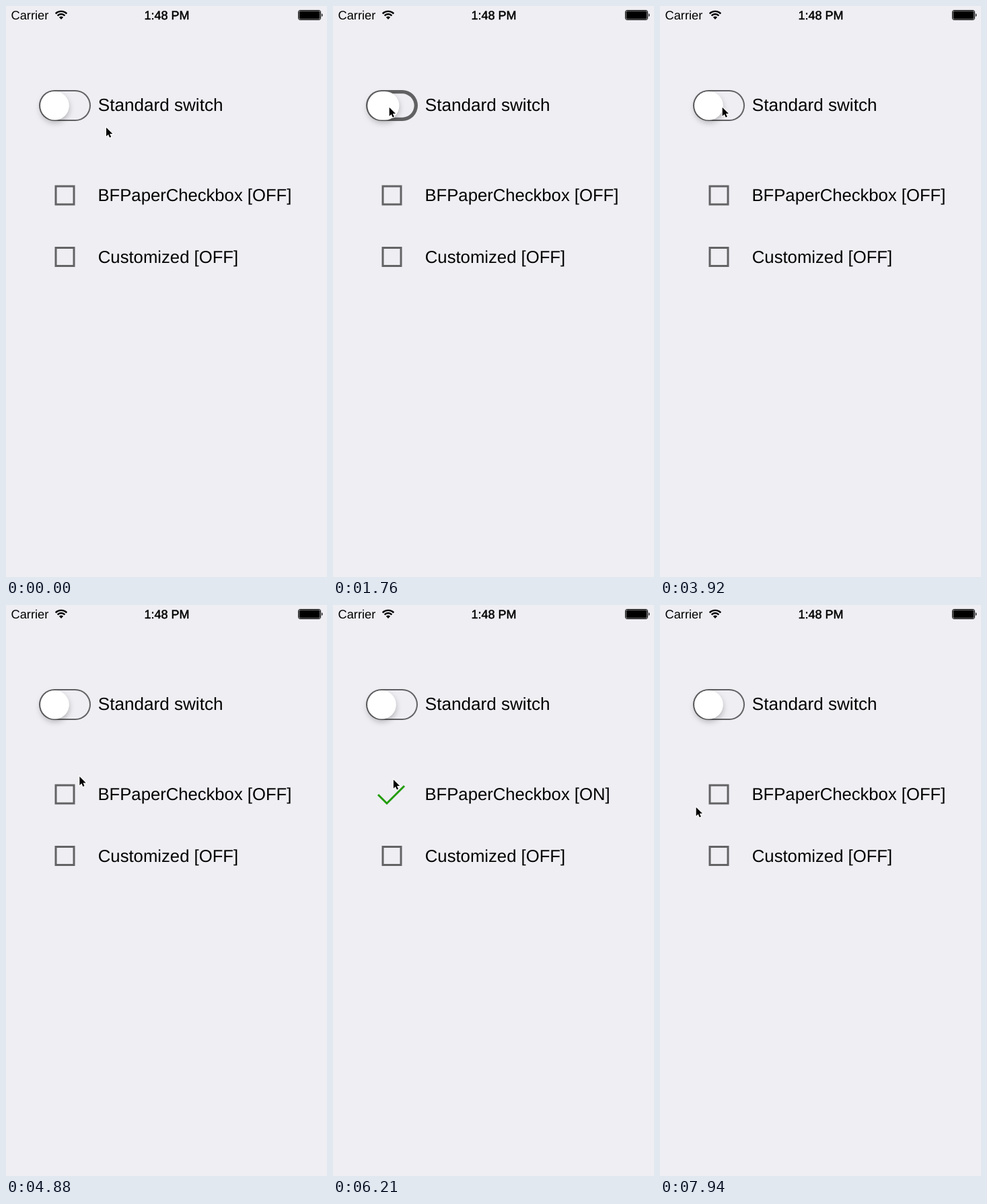
Recreate the animation shown at these times as an HTML page. Size 477 by 849 pixels, loop 8 s.

```html
<!DOCTYPE html>
<html lang="en">
<head>
<meta charset="utf-8">
<title>Switch and checkboxes</title>
<style>
  html, body { margin: 0; width: 100%; height: 100%; overflow: hidden; background: #eeeef3; }
  svg { display: block; width: 477px; height: 849px; font-family: "Liberation Sans", Arial, sans-serif; text-rendering: geometricPrecision; }
  .box { fill: none; stroke: #636365; stroke-width: 3; vector-effect: non-scaling-stroke; }
  #thumb { filter: drop-shadow(0 4px 4.5px rgba(0, 0, 0, .25)); }
</style>
</head>
<body>
<svg viewBox="0 0 477 849">
  <rect width="477" height="849" fill="#eeeef3"/>

  <!-- status bar -->
  <text x="7.5" y="20" font-size="18.3">Carrier</text>
  <g fill="none" stroke="#000" stroke-width="2.4">
    <path d="M73.7 11.3A11.8 11.8 0 0 1 90.3 11.3M76.6 14.3A7.6 7.6 0 0 1 87.4 14.3"/>
    <path d="M82 20L78.9 16.8A4.4 4.4 0 0 1 85.1 16.8Z" fill="#000" stroke="none"/>
  </g>
  <text x="239" y="20" font-size="18" text-anchor="middle" stroke="#000" stroke-width=".5">1:48 PM</text>
  <rect x="434.5" y="6.5" width="33" height="14" rx="2.5" fill="none" stroke="#000"/>
  <rect x="435.6" y="7.6" width="30.8" height="11.8" rx="1.6"/>
  <path d="M469 11a2 2.6 0 0 1 0 5z"/>

  <!-- switch -->
  <rect id="track" x="49" y="125" width="77" height="46" rx="23"/>
  <rect id="inner" fill="#eeeef3"/>
  <rect id="thumb" y="127" height="42.5" rx="21.2" fill="#fff"/>

  <!-- checkboxes -->
  <circle id="ripple" cx="87.5" cy="281.5"/>
  <rect id="box" class="box" x="-13.5" y="-13.5" width="27" height="27"/>
  <path id="check" fill="none" stroke="#219c08" stroke-width="3"/>
  <rect class="box" x="74" y="359.5" width="27" height="27"/>

  <text x="136.8" y="156.3" font-size="26.1">Standard switch</text>
  <text id="label" x="136.5" y="290" font-size="25.65"></text>
  <text x="136.8" y="381.5" font-size="25.7">Customized [OFF]</text>

  <path id="cursor" d="M0 .7V13.8L3 11L5 15.6L7.2 14.7L5.2 10.1H9.3Z" stroke="#fff" stroke-width="2" paint-order="stroke"/>
</svg>
<script>
const LOOP = 8000;
const $ = id => document.getElementById(id);
const set = (id, attrs) => { for (const k in attrs) $(id).setAttribute(k, attrs[k]); };
const mix = (a, b, p) => a + (b - a) * p;
const mixColor = (a, b, p) => `rgb(${a.map((v, i) => mix(v, b[i], p))})`;
const ramp = (t, from, to) => Math.min(1, Math.max(0, (t - from) / (to - from)));
const easeOut = p => 1 - (1 - p) ** 2;
const easeInOut = p => p < .5 ? 2 * p * p : 1 - 2 * (1 - p) ** 2;
const smooth = (t, from, to) => easeInOut(ramp(t, from, to));

const GRAY = [97, 97, 99], GREEN = [38, 155, 5];

// time, x, y of the pointer tip
const POINTER = [
  [0, 149, 180], [660, 149, 180], [1280, 83.7, 150], [2450, 83.7, 150], [2550, 86, 150],
  [2580, 86, 150], [2810, 91.8, 150], [2930, 91.8, 150], [2970, 92.7, 150], [4180, 92.7, 150],
  [4970, 109.8, 257], [5950, 109.8, 257], [6600, 48, 258], [7450, 48, 258], [7940, 53.7, 300], [LOOP, 53.7, 300]
];

function drawSwitch(t) {
  const firstPress = t < 1760 ? 0 : ramp(t, 1675, 1980);
  const on = smooth(t, 2220, 2550), off = smooth(t, 3540, 3910);
  const wide = easeOut(firstPress) * (1 - on) + (t < 3140 ? 0 : easeOut(ramp(t, 3090, 3420))) * (1 - off);
  const side = on - off;
  const width = 42.5 + 9.5 * wide;
  set('thumb', { x: mix(51.3, 124 - width, side), width });
  set('track', { fill: mixColor(GRAY, GREEN, side) });

  const inset = 2 + 21 * (easeInOut(firstPress) - off);
  set('inner', {
    x: 49 + inset, y: 125 + inset, rx: 23 - inset,
    width: inset > 22.9 ? 0 : 77 - 2 * inset, height: Math.max(0, 46 - 2 * inset)
  });
}

function drawRipple(t) {
  const second = t > 6700;
  const [down, up] = second ? [6740, 7420] : [5020, 5690];
  const grow = t < down ? 0 : easeOut(ramp(t, down - 50, down + 140));
  set('ripple', {
    r: 58.5 * grow,
    fill: second ? '#636365' : '#259b24',
    opacity: .3 * (1 - ramp(t, up + 30, up + 500))
  });
}

function drawCheckbox(t) {
  // the box spins, shrinks into the tick's corner, then the tick grows from there
  const gone = ramp(t, 5700, 6000) - ramp(t, 7570, 7870);
  const spin = ramp(gone, 0, .5), shrink = ramp(gone, .5, 1);
  set('box', {
    transform: `translate(${87.5 - 7.5 * shrink} ${281.5 + 13.5 * shrink}) rotate(${45 * spin}) scale(${(1 - spin / 2) * (1 - shrink)})`,
    visibility: gone < 1 ? 'visible' : 'hidden'
  });
  const tick = ramp(t, 6000, 6170) - ramp(t, 7420, 7570);
  const left = 13 * tick, right = 26 * tick;
  set('check', {
    d: `M${80 - left} ${295 - left}L80 295L${80 + right} ${295 - right}`,
    visibility: tick > 0 ? 'visible' : 'hidden'
  });
  $('label').textContent = `BFPaperCheckbox [${t >= 5690 && t < 7420 ? 'ON' : 'OFF'}]`;
}

function drawPointer(t) {
  const i = POINTER.findIndex(p => t < p[0]);
  const [t0, x0, y0] = POINTER[i - 1], [t1, x1, y1] = POINTER[i];
  const p = smooth(t, t0, t1);
  const sag = t0 === 5950 ? 2 * Math.sin(Math.PI * p) : 0;
  set('cursor', { transform: `translate(${mix(x0, x1, p)} ${mix(y0, y1, p) + sag})` });
}

const start = performance.now();
function frame() {
  const t = (performance.now() - start) % LOOP;
  drawSwitch(t);
  drawRipple(t);
  drawCheckbox(t);
  drawPointer(t);
  requestAnimationFrame(frame);
}
frame();
</script>
</body>
</html>
```
